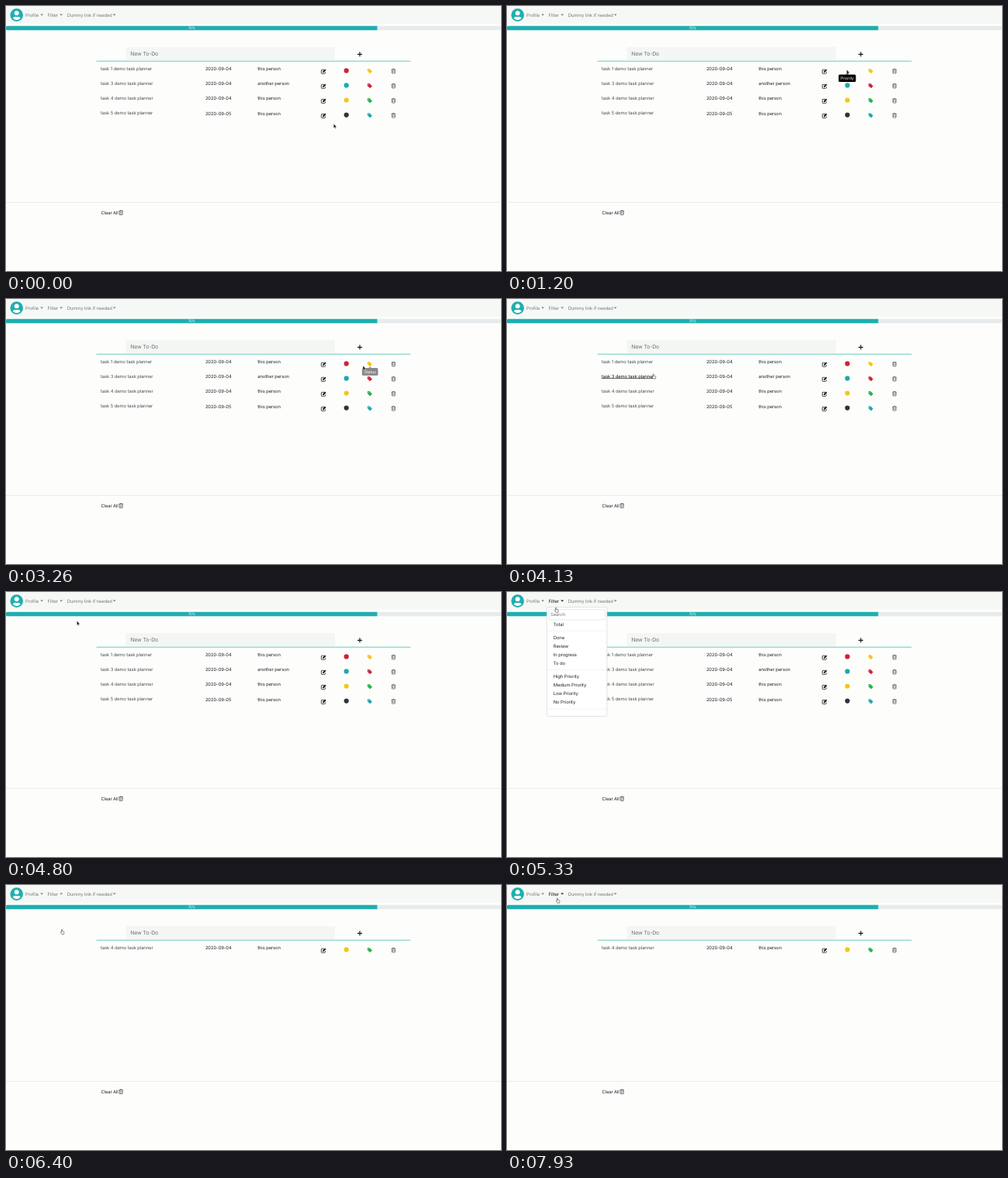
Recreate the animation shown at these times as an HTML page. Size 638x342 px, loop 8000 ms.

```html
<!DOCTYPE html>
<html lang="en">
<head>
<meta charset="utf-8">
<title>Task planner</title>
<style>
  html, body { margin: 0; width: 100%; height: 100%; overflow: hidden; background: #fdfefc; }
  svg { display: block; width: 100%; height: 100%; }
  text {
    font: 5.9px Inter, "Open Sans", sans-serif;
    letter-spacing: -.02em;
    text-rendering: geometricPrecision;
    fill: #212529;
  }
  .nav { fill: #777b79; }
  .nav.active { fill: #111; }
  .task { fill: #4a4f52; }
  .task.hover { fill: #111; }
  .tip text { font-size: 5.2px; fill: #fff; text-anchor: middle; }
  .hidden { visibility: hidden; }
</style>
</head>
<body>
<svg viewBox="0 0 638 342" preserveAspectRatio="none">
  <defs>
    <g id="edit">
      <path d="M1.2 -2.2H-2.1Q-2.8 -2.2 -2.8 -1.5V2.2Q-2.8 2.9 -2.1 2.9H1.6Q2.3 2.9 2.3 2.2V.8" fill="none" stroke="#1b1e20" stroke-width=".8"/>
      <path d="M-1.2 1.6L-1 0 2 -3 3.4 -1.6 .4 1.4Z" fill="#1b1e20"/>
    </g>
    <path id="tag" d="M-3 -2.4Q-3 -3 -2.4 -3H-.1L2.8 0Q3.2 .4 2.8 .8L.8 2.8Q.4 3.2 0 2.8L-3 -.1ZM-1.7 -2.2a.5 .5 0 1 0 .01 0Z"/>
    <g id="trash" fill="none" stroke="#25292c" stroke-width=".6">
      <path d="M-2.7 -2H2.7M-1.1 -2L-.7 -2.8H.7L1.1 -2M-2 -2V2.5Q-2 2.9 -1.6 2.9H1.6Q2 2.9 2 2.5V-2"/>
      <path d="M-.8 -.8V1.8M.8 -.8V1.8" stroke-width=".5"/>
    </g>
  </defs>

  <rect width="638" height="342" fill="#fdfefc"/>
  <rect width="638" height="22.5" fill="#f6f8f6"/>
  <g transform="translate(5.4 3) scale(.0335)">
    <circle cx="248" cy="256" r="248" fill="#1fafaf"/>
    <g fill="#fff">
      <circle cx="248" cy="184" r="88"/>
      <path d="M101 380C120 344 157 320 200 320Q248 336 296 320C339 320 376 344 395 380A192 192 0 0 1 101 380Z"/>
    </g>
  </g>
  <g id="menu"></g>

  <rect y="25.8" width="638" height="5.4" rx="1.5" fill="#e8ebec"/>
  <path d="M1.5 25.8H478.5V31.2H1.5Q0 31.2 0 29.7V27.3Q0 25.8 1.5 25.8Z" fill="#1fafb1"/>
  <text x="239.3" y="30.1" text-anchor="middle" style="font-size:4.5px;fill:#fff">75%</text>

  <rect x="154.5" y="53" width="269.5" height="17" fill="#f4f6f4"/>
  <text x="160.3" y="64.1" style="font-size:6.9px;fill:#697176">New To-Do</text>
  <path d="M453 62.3H459M456 59.3V65.3" stroke="#15181a" stroke-width="1.2"/>
  <rect x="116.5" y="70.7" width="405" height=".9" fill="#58c5b2"/>
  <g id="rows"></g>

  <rect y="253" width="638" height=".7" fill="#e3e6e3"/>
  <text x="122.4" y="268.9">Clear All</text>
  <use href="#trash" x="148.2" y="266.6"/>
  <g id="tips"></g>
  <g id="dropdown"></g>

  <path id="arrow" d="M0 0V5.7L1.3 4.5 2.1 6.3 3 5.9 2.2 4.2H4Z" fill="#111" stroke="#fff" stroke-width=".4"/>
  <path id="hand" d="M-.6 3.2V.4A.5 .5 0 0 1 .4 .4V2.3L2.4 2.7Q3.1 2.9 3 3.7L2.5 6.2H0L-1.8 3.9Q-1.6 3 -.6 3.8Z" fill="#fff" stroke="#222" stroke-width=".5"/>
</svg>

<script>
const LOOP = 8000;
const $ = id => document.getElementById(id);

function add(parent, tag, attrs = {}, content = '') {
  const node = document.createElementNS('http://www.w3.org/2000/svg', tag);
  for (const key in attrs) node.setAttribute(key, attrs[key]);
  node.textContent = content;
  return parent.appendChild(node);
}
const label = (parent, x, y, content, cls = '') =>
  add(parent, 'text', { x, y, class: cls }, content);

const menu = [['Profile', 25, 44.2], ['Filter', 53.6, 69.3], ['Dummy link if needed', 78.8, 137.8]]
  .map(([name, x, caretX]) => {
    const item = add($('menu'), 'g', { class: 'nav' });
    label(item, x, 13.7, name).style.fill = 'inherit';
    add(item, 'path', { d: `M${caretX} 10.4h3.8l-1.9 2Z` });
    return item;
  });

const RED = '#d22039', TEAL = '#1ca9b4', YELLOW = '#f5c518', GREEN = '#2bb24c', DARK = '#2f3437';
const rows = [
  [1, '2020-09-04', 'this person', RED, YELLOW],
  [3, '2020-09-04', 'another person', TEAL, RED],
  [4, '2020-09-04', 'this person', YELLOW, GREEN],
  [5, '2020-09-05', 'this person', DARK, TEAL],
].map(([id, date, person, priority, status]) => {
  const group = add($('rows'), 'g');
  const task = label(group, 122, 82.5, `task ${id} demo task planner`, 'task');
  const underline = add(group, 'rect', { x: 122, y: 83.2, width: 67, height: .6, fill: '#111' });
  label(group, 256.9, 83.4, date);
  label(group, 324.2, 83.4, person);
  add(group, 'use', { href: '#edit', x: 409.2, y: 84.4 });
  const dot = add(group, 'circle', { cx: 438.7, cy: 83.4, r: 3.1, fill: priority });
  const tag = add(group, 'use', { href: '#tag', x: 468.8, y: 84, fill: status, 'fill-rule': 'evenodd' });
  add(group, 'use', { href: '#trash', x: 499.4, y: 84 });
  return { group, task, underline, dot, tag };
});

function tooltip(x, y, width, content) {
  const tip = add($('tips'), 'g', { class: 'tip', transform: `translate(${x} ${y})` });
  add(tip, 'rect', { x: -width / 2, y: -4.8, width, height: 9.6, rx: 1.5 });
  add(tip, 'path', { d: 'M-2 -4.7L0 -6.6 2 -4.7Z' });
  label(tip, 0, 1.9, content);
  return tip;
}
const priorityTip = tooltip(438.5, 93.2, 22.2, 'Priority');
const statusTip = tooltip(469.2, 93.9, 20.6, 'Status');

const dropdown = $('dropdown');
add(dropdown, 'rect', { x: 51.3, y: 19.6, width: 77.6, height: 140.8, rx: 1.5, fill: '#fefffe', stroke: '#cfd2d0', 'stroke-width': .6 });
add(dropdown, 'rect', { x: 54, y: 22.6, width: 72.3, height: 13.3, rx: 1.5, fill: '#fff', stroke: '#ced4da', 'stroke-width': .5 });
label(dropdown, 56, 31.3, 'Search').style.fill = '#6c757d';
[['Total', 41.4], ['Done', 58.7], ['Review', 69.8], ['In progress', 80.9], ['To do', 92],
 ['High Priority', 109.3], ['Medium Priority', 120.3], ['Low Priority', 131.3], ['No Priority', 142.3],
].forEach(([name, y]) => label(dropdown, 59.8, y + 2.1, name));
for (const y of [49.8, 100.4, 150.8])
  add(dropdown, 'rect', { x: 51.6, y, width: 77, height: .5, fill: '#e6e9ea' });

// Pointer tip: time, x, y
const route = [
  [0, 422.3, 152], [200, 422.3, 152], [880, 437.8, 82.3], [1500, 437.8, 82.3],
  [1850, 467.8, 82.3], [3050, 467.8, 82.3], [3260, 460, 86], [3700, 290, 151],
  [4030, 188.8, 96.8], [4350, 188.8, 96.8], [5000, 63.2, 20.2], [5450, 63.2, 20.2],
  [5950, 72, 57.4], [7200, 72, 57.4], [7700, 65, 17], [LOOP, 65, 17],
];
const clamp = v => Math.max(0, Math.min(1, v));
const within = (t, from, to) => t >= from && t < to;
const fade = (t, from, to) => clamp((t - from) / 150) * clamp((to + 150 - t) / 150);
const show = (node, on) => node.classList.toggle('hidden', !on);

function pointerAt(t) {
  const i = route.findIndex(step => step[0] > t);
  const [t0, x0, y0] = route[i - 1], [t1, x1, y1] = route[i];
  const p = (t - t0) / (t1 - t0), e = p * p * (3 - 2 * p);
  return [x0 + (x1 - x0) * e, y0 + (y1 - y0) * e];
}

function render(t) {
  const filtered = t >= 6200;
  rows.forEach(({ group, task, underline, dot, tag }, i) => {
    const hovered = i === 1 && within(t, 3960, 4450);
    group.style.display = filtered && i !== 2 ? 'none' : '';
    group.setAttribute('transform', `translate(0 ${filtered ? 0 : i * 19.05})`);
    task.classList.toggle('hover', hovered);
    show(underline, hovered);
    show(dot, !(i === 0 && within(t, 840, 1560)));
    show(tag, !(i === 0 && within(t, 1780, 3120)));
  });

  priorityTip.style.opacity = fade(t, 880, 1560);
  statusTip.style.opacity = fade(t, 1800, 3180);
  show(dropdown, within(t, 5200, 6200));
  menu[1].classList.toggle('active', within(t, 4920, 6200) || t >= 7600);

  const hand = within(t, 3960, 4450) || within(t, 4920, 7300) || t >= 7600;
  const [x, y] = pointerAt(t);
  for (const id of ['arrow', 'hand']) {
    $(id).setAttribute('transform', `translate(${x} ${y})`);
    show($(id), (id === 'hand') === hand);
  }
}

const start = performance.now();
function tick() {
  render((performance.now() - start) % LOOP);
  requestAnimationFrame(tick);
}
tick();
</script>
</body>
</html>
```
